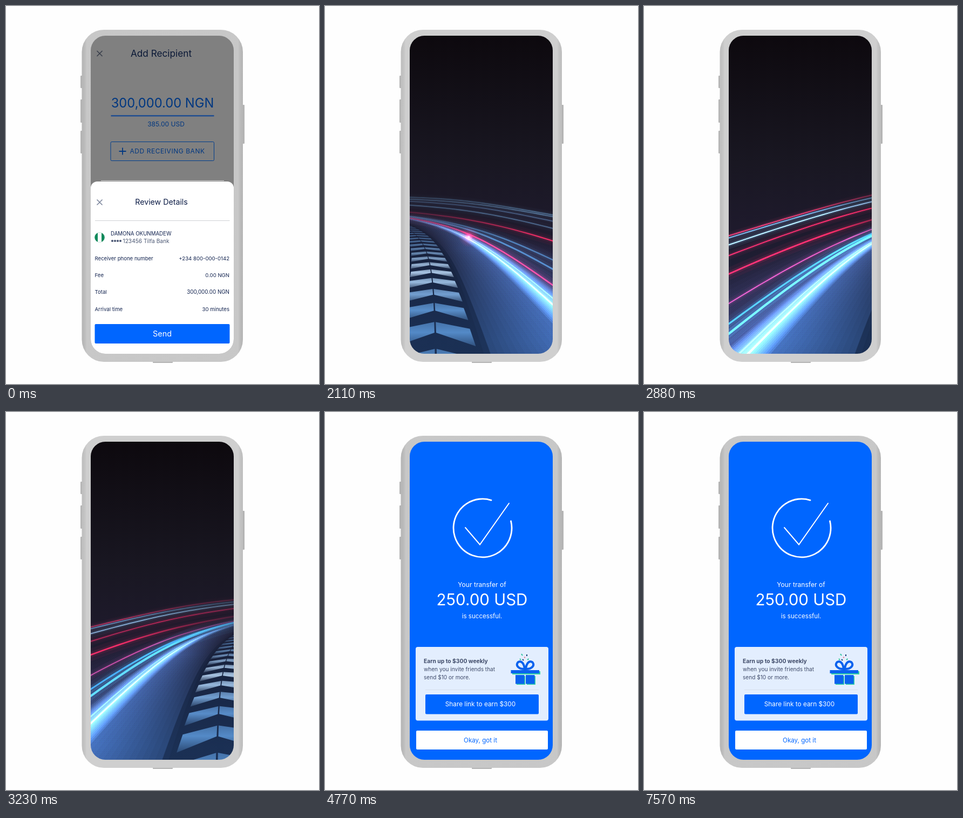
Write an HTML page with a canvas that moves like this. It is 580 by 700 pixels and loops after 8 s.

```html
<!DOCTYPE html>
<html lang="en">
<head>
<meta charset="utf-8">
<title>Money transfer</title>
<style>
  html, body { margin: 0; width: 100%; height: 100%; overflow: hidden; background: #fefefe; }
  svg, canvas { position: absolute; display: block; }
  svg { left: 0; top: 0; }
  canvas { left: 157px; top: 55px; border-radius: 27px; }
  text { font-family: Inter, "Noto Sans", sans-serif; }
  .mid { text-anchor: middle; }
  .end { text-anchor: end; }
  .small { font-size: 9.6px; fill: #12234f; }
</style>
</head>
<body>
<svg width="580" height="700" viewBox="0 0 580 700">
  <defs>
    <clipPath id="screen"><rect x="157" y="55" width="265" height="589" rx="27"/></clipPath>
    <clipPath id="flag"><circle cx="173.500" cy="428.500" r="9.300"/></clipPath>
    <linearGradient id="shade">
      <stop offset="0" stop-color="#000" stop-opacity=".05"/>
      <stop offset=".03" stop-color="#fff" stop-opacity=".12"/>
      <stop offset=".97" stop-color="#fff" stop-opacity=".12"/>
      <stop offset="1" stop-color="#000" stop-opacity=".05"/>
    </linearGradient>
  </defs>

  <g fill="#b4b4b4">
    <rect x="138" y="129" width="4" height="23" rx="1"/>
    <rect x="138" y="173" width="4" height="43" rx="1"/>
    <rect x="138" y="231" width="4" height="42" rx="1"/>
    <rect x="438" y="183" width="4" height="72" rx="1"/>
    <rect x="272" y="657" width="37" height="4" rx="1"/>
  </g>
  <rect id="body" x="140.500" y="44" width="298.500" height="615" rx="41"/>
  <rect x="140.500" y="44" width="298.500" height="615" rx="41" fill="url(#shade)"/>

  <g id="review" clip-path="url(#screen)">
    <rect x="157" y="55" width="265" height="589" fill="#808080"/>
    <path d="M168.500 83l10 10m0-10l-10 10" stroke="#3b414d" stroke-width="1.700"/>
    <text class="mid" x="287.500" y="94" font-size="17.200" fill="#0a1836">Add Recipient</text>
    <g fill="#003780">
      <text class="mid" x="290" y="188" font-size="23.700">300,000.00 NGN</text>
      <rect x="194.500" y="202" width="191" height="2.600" fill="#234f90"/>
      <text class="mid" x="296.500" y="223" font-size="12">385.00 USD</text>
      <text x="229.500" y="273" font-size="12" letter-spacing=".55">ADD RECEIVING BANK</text>
    </g>
    <rect x="194" y="251.500" width="191.500" height="35" rx="2" fill="none" stroke="#003d8c"/>
    <path d="M209.500 269h13m-6.500-6.500v13" stroke="#003780" stroke-width="1.800"/>
    <path d="M176 323.500h228" stroke="#d8d8d8"/>
    <rect x="157" y="325" width="265" height="340" rx="12" fill="#fff"/>
    <path d="M168.500 358.500l10 10m0-10l-10 10" stroke="#79839a" stroke-width="1.500"/>
    <text class="mid" x="288" y="368" font-size="14.200" fill="#0c1c46">Review Details</text>
    <path d="M165 397.500h249.500" stroke="#cfd1d4"/>
    <g clip-path="url(#flag)">
      <rect x="164" y="419" width="19" height="19" fill="#118a5c"/>
      <rect x="170" y="419" width="7" height="19" fill="#fff"/>
    </g>
    <text x="194" y="425" font-size="9.700" fill="#12234f">DAMONA OKUNMADEW</text>
    <g fill="#4c5874">
      <circle cx="197" cy="435" r="2.100"/><circle cx="202" cy="435" r="2.100"/>
      <circle cx="207" cy="435" r="2.100"/><circle cx="212" cy="435" r="2.100"/>
      <text x="216.500" y="438.500" font-size="10.200">123456 Tilfa Bank</text>
    </g>
    <g class="small">
      <text x="164.500" y="471">Receiver phone number</text>
      <text class="end" x="414" y="471">+234 800-000-0142</text>
      <text x="164.500" y="502">Fee</text>
      <text class="end" x="414" y="502">0.00 NGN</text>
      <text x="164.500" y="533">Total</text>
      <text class="end" x="414" y="533" font-size="9.800">300,000.00 NGN</text>
      <text x="164.500" y="564.500">Arrival time</text>
      <text class="end" x="414" y="564.500">30 minutes</text>
    </g>
    <rect x="164.500" y="589" width="250" height="36" rx="2" fill="#0066ff"/>
    <text class="mid" x="289.500" y="611.500" font-size="14.400" fill="#fff">Send</text>
  </g>

  <g id="done" clip-path="url(#screen)">
    <rect x="157" y="55" width="265" height="589" fill="#0066ff"/>
    <g fill="none" stroke="#fff" stroke-linecap="round">
      <path d="M308 163.300A54 54 0 1 0 344.500 202" stroke-width="2.800"/>
      <path d="M260 214l27 31.500 54-76.500" stroke-width="2"/>
    </g>
    <g class="mid" fill="#fff">
      <text x="291" y="324" font-size="12.100">Your transfer of</text>
      <text x="291" y="358" font-size="29.500">250.00 USD</text>
      <text x="291" y="382" font-size="11.600">is successful.</text>
    </g>
    <rect x="168" y="435" width="246" height="136.500" rx="4" fill="#e3eefe"/>
    <g fill="#3f4b69">
      <text x="183" y="464.500" font-size="10.300" font-weight="700">Earn up to $300 weekly</text>
      <text x="183" y="479.500" font-size="10.100">when you invite friends that</text>
      <text x="183" y="494.500" font-size="10.100">send $10 or more.</text>
    </g>
    <path d="M186 514.500h210" stroke="#d6dfec"/>
    <rect x="186" y="523" width="210" height="36.500" rx="2" fill="#0066ff"/>
    <text class="mid" x="288" y="545" font-size="11.800" fill="#fff">Share link to earn $300</text>
    <rect x="169" y="590" width="244" height="35" rx="2" fill="#fff"/>
    <text class="mid" x="288" y="611.500" font-size="11.600" fill="#0066ff">Okay, got it</text>
    <path d="M347 480h52v6h-52zM355 489h16v16h-16zM374 489h16v16h-16z" fill="#2fd3a5"/>
    <path d="M344.500 478h52.500v6h-52.500zM353 487h16.500v16.500h-16.500zM372 487h16.500v16.500h-16.500z" fill="#0a62ee"/>
    <path d="M370 476C358 476 353 469 357.500 463.500C364 459 369 466 370 476zM372 476C384 476 389 469 384.500 463.500C378 459 373 466 372 476z" fill="none" stroke="#0a62ee" stroke-width="4"/>
    <g stroke-width="2">
      <path d="M364 448l2 3M375 459l2.500-2M361 457l2 2" stroke="#2fc49d"/>
      <path d="M374 449v3M366 458l2 2" stroke="#173a7a"/>
      <path d="M369 454l2 1" stroke="#ee7c8c"/>
    </g>
  </g>
  <path id="cursor" d="M0 0L1.500 37 8.500 29 15 42.500 26 37 18.500 23 30 19.500z"/>
</svg>
<canvas id="road" width="265" height="589"></canvas>

<script>
const $ = id => document.getElementById(id);
const body = $('body'), review = $('review'), done = $('done'), cursor = $('cursor'), road = $('road');
const ctx = road.getContext('2d');

const LOOP = 8000, STEP = 70, REST = 500, LAST = 4770;
const RIDE = 1410, SUCCESS = 4210;
const HORIZON = 346, MIDDLE = 285;
const SPEED = 1.8667e-5, ROW = .00072, LAMP_GAP = .03004;

// time, sideways shift, curvature, roll, streak strength
const POSES = [
  [1410, 0, 0, 0, .2],
  [2110, -77, -241600, 0, .8],
  [2880, 205, 600000, -.12, 1.2],
  [3580, 0, 0, 0, .2],
  [4300, 0, 0, 0, .2]
];

// lateral place, height, colour, thickness
const LEFT = [
  [.85, .84, '225,25,65', 1.6], [1.26, .75, '80,165,205', 1.6],
  [1.5, .65, '150,210,245', 2], [1.85, .47, '220,20,65', 1.9],
  [2.35, .12, '240,20,65', 2.8], [1.85, 0, '195,50,125', 1.8],
  [1.52, 0, '30,140,190', 3], [1.4, 0, '55,185,225', 4]
];
const RIGHT = [
  [.85, .84, '60,105,130', 1.6], [1.26, .75, '70,115,140', 1.4],
  [1.5, .65, '50,80,105', 2], [1.85, .47, '60,100,125', 1.6],
  [2.35, .12, '225,20,60', 2.2], [1.85, 0, '40,90,120', 2.6],
  [1.6, 0, '45,105,140', 3], [1.3, 0, '220,20,65', 2.6]
];
const DEPTHS = Array.from({ length: 70 }, (_, i) => 22 * Math.pow(20, i / 69));

const mod = (a, n) => ((a % n) + n) % n;
const clamp = x => Math.max(0, Math.min(1, x));
const smooth = x => x * x * (3 - 2 * x);

function poseAt(t) {
  let i = 0;
  while (i < POSES.length - 2 && t > POSES[i + 1][0]) i++;
  const a = POSES[i], b = POSES[i + 1];
  const p = smooth(clamp((t - a[0]) / (b[0] - a[0])));
  return a.map((v, k) => v + (b[k] - v) * p);
}

function fade(rgb, alpha, from = 375, to = 450) {
  const g = ctx.createLinearGradient(0, from, 0, to);
  g.addColorStop(0, `rgba(${rgb},0)`);
  g.addColorStop(1, `rgba(${rgb},${clamp(alpha)})`);
  return g;
}

function trace(points) {
  ctx.beginPath();
  points.forEach(p => ctx.lineTo(p[0], p[1]));
}

function drawRoad(t) {
  const [, shift, bend, roll, glow] = poseAt(t);
  const at = (w, u, h = 0) => {
    const x = MIDDLE + shift + bend / (u * u) + w * u;
    return [x, HORIZON + u * (1 - h) + roll * (x - 290)];
  };
  const band = (w1, w2, paint) => {
    trace([...DEPTHS.map(u => at(w1, u)), ...DEPTHS.map(u => at(w2, u)).reverse()]);
    ctx.fillStyle = paint;
    ctx.fill();
  };
  // nested bands that build up from w1 and w3 towards w2
  const soft = (s, w1, w2, w3, paint, n) => {
    for (let i = 0; i < n; i++) {
      const p = i / n;
      band(s * (w1 + (w2 - w1) * p), s * (w3 + (w2 - w3) * p), paint);
    }
  };

  ctx.setTransform(1, 0, 0, 1, -157, -55);
  ctx.globalCompositeOperation = 'source-over';
  const sky = ctx.createLinearGradient(0, 55, 0, 644);
  sky.addColorStop(0, '#0d090e');
  sky.addColorStop(.4, '#191722');
  sky.addColorStop(.6, '#1e1a2c');
  sky.addColorStop(1, '#1f2746');
  ctx.fillStyle = sky;
  ctx.fillRect(157, 55, 265, 589);

  band(-1.07, 1.07, fade('39,68,115', .95, 380, 620));
  band(-.34, .34, fade('12,24,48', .45, 380, 470));

  ctx.globalCompositeOperation = 'lighter';
  for (const s of [-1, 1]) {
    soft(s, .3, 1.07, 1.07, fade('52,80,132', .045), 18);
    soft(s, 1.07, 1.07, 2.7, fade('60,55,100', .035 * glow), 12);
    soft(s, 1.07, 1.07, 1.5, fade('40,90,150', .05 * glow), 10);
  }

  ctx.lineCap = 'round';
  [[LEFT, -1], [RIGHT, 1]].forEach(([list, s]) => list.forEach(([w, h, rgb, size]) => {
    const alpha = h > .3 ? clamp((glow - .2) / .8) : .4 + .6 * clamp(glow);
    const [from, to] = h > .3 ? [325, 385] : [365, 430];
    trace(DEPTHS.map(u => at(s * w, u, h)));
    for (const [width, strength] of [[8, .06], [3.5, .12], [1, .9]]) {
      ctx.lineWidth = size * width;
      ctx.strokeStyle = fade(rgb, strength * alpha, from, to);
      ctx.stroke();
    }
  }));

  for (const s of [-1, 1]) {
    soft(s, .9, 1.07, 1.26, fade('85,140,195', .12, 380, 440), 9);
    band(s * 1.12, s * 1.14, fade('130,190,225', .35, 380, 430));
    band(s * 1.05, s * 1.075, fade('150,190,225', .5, 380, 430));
  }

  ctx.globalCompositeOperation = 'source-over';
  const travel = SPEED * (t - 3580);
  const first = .0028 + mod(.0041 - travel - .0028, ROW);
  for (let k = 44; k >= 0; k--) {
    const z = first + k * ROW, u = 1 / z;
    const shine = .75 * Math.exp(-Math.pow((u - 140) / 38, 2));
    const tone = [90, 148, 212].map((c, i) => Math.round(c + ([215, 235, 255][i] - c) * shine));
    const alpha = .9 * clamp(u / 140);
    const top = at(0, u)[1], bottom = at(0, 1 / (z - .0007))[1];
    const paint = ctx.createLinearGradient(0, top, 0, bottom);
    paint.addColorStop(0, `rgba(${tone},${alpha * .75})`);
    paint.addColorStop(.4, `rgba(${tone},${alpha})`);
    paint.addColorStop(1, `rgba(${tone},${alpha * .3})`);
    ctx.fillStyle = paint;
    for (const s of [-1, 1]) {
      trace([
        at(s * .006, u), at(s * .255, 1 / (z - .00021)),
        at(s * .262, 1 / (z - .00066)), at(s * .006, 1 / (z - .00032))
      ]);
      ctx.fill();
    }
  }

  const lamp = 1 / Math.max(.002, mod(.0149 - travel, LAMP_GAP));
  ctx.globalCompositeOperation = 'lighter';
  for (const s of [-1, 1]) {
    const [x, y] = at(s * 1.17, lamp);
    const r = Math.min(40, lamp * .24);
    const g = ctx.createRadialGradient(x, y, 0, x, y, r);
    g.addColorStop(0, 'rgba(255,150,165,.9)');
    g.addColorStop(.14, 'rgba(245,40,70,.8)');
    g.addColorStop(.4, 'rgba(190,15,50,.3)');
    g.addColorStop(1, 'rgba(150,10,40,0)');
    ctx.fillStyle = g;
    ctx.fillRect(x - r, y - r, 2 * r, 2 * r);
  }
}

function render(time) {
  const t = time < REST ? 0 : Math.min(LAST, REST + Math.floor((time - REST) / STEP) * STEP);
  const riding = t >= RIDE && t < SUCCESS;
  review.style.display = t < RIDE ? '' : 'none';
  done.style.display = t >= SUCCESS ? '' : 'none';
  road.style.display = riding ? '' : 'none';
  body.setAttribute('fill', riding ? '#c9c9c9' : '#c0c0c0');
  cursor.style.display = t >= REST && t < RIDE ? '' : 'none';
  const p = 1 - Math.pow(1 - clamp((t - 430) / 560), 2);
  cursor.setAttribute('transform', `translate(${289.5 + 40 * (1 - p)} ${600 + 105 * (1 - p)})`);
  if (riding) drawRoad(t);
}

const start = performance.now();
function tick() {
  render((performance.now() - start) % LOOP);
  requestAnimationFrame(tick);
}
tick();
</script>
</body>
</html>
```
